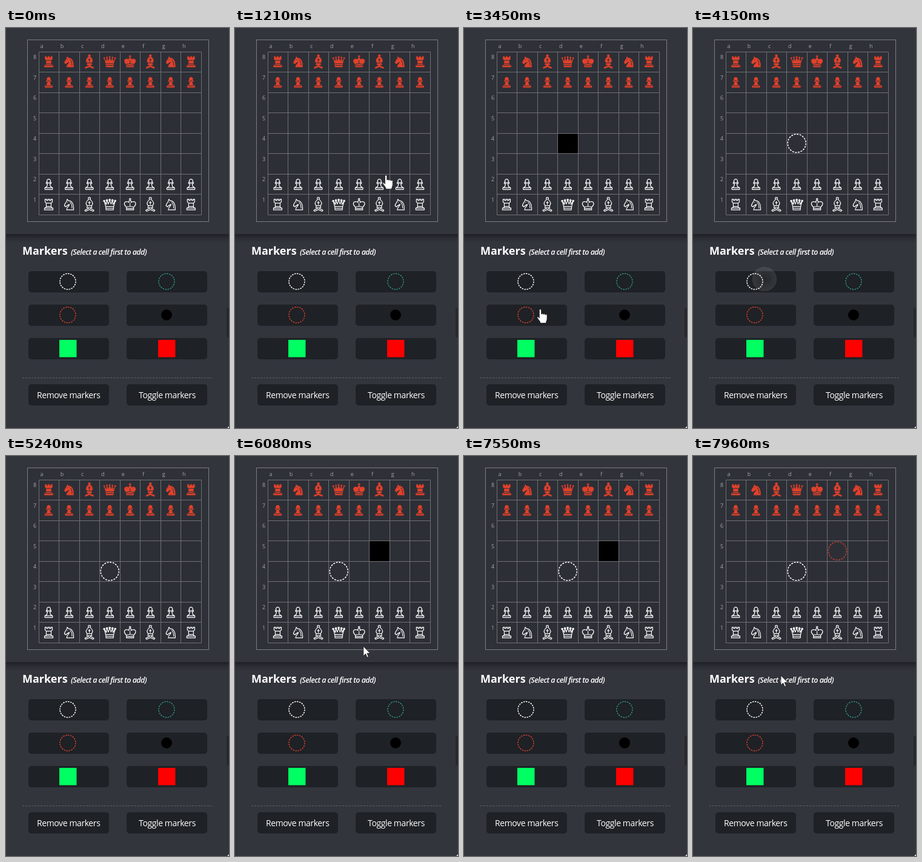
An HTML page that plays this animation: 368x658 px, repeating every 8000 ms.

```html
<!DOCTYPE html>
<html lang="en">
<head>
<meta charset="utf-8">
<title>Board markers</title>
<style>
  html, body { margin: 0; width: 100%; height: 100%; overflow: hidden; background: #33353d; }
  svg { display: block; width: 368px; height: 658px; font-family: "Open Sans", "Noto Sans", sans-serif; }
  .label { font-size: 9px; fill: #a3a5a9; text-anchor: middle; }
  .title { font-size: 18px; font-weight: 700; fill: #fff; }
  .hint { font-size: 12.5px; font-weight: 600; font-style: italic; letter-spacing: -.55px; fill: #fff; }
  .btn { font-size: 14px; letter-spacing: -.4px; fill: #fff; text-anchor: middle; }
  .red { fill: #e2412b; stroke: #e2412b; stroke-width: .4; }
  .red .detail { fill: none; stroke: #2d2f36; stroke-width: 1; }
  .white { fill: #2d2f36; stroke: #fff; stroke-width: 1.2; stroke-linejoin: round; }
  .white .detail { fill: none; stroke-width: 1.1; }
  .cursor { fill: #fff; stroke: #111; stroke-width: .8; stroke-linejoin: round; }
</style>
</head>
<body>
<svg id="stage" viewBox="0 0 368 658" xmlns="http://www.w3.org/2000/svg">
  <defs>
    <linearGradient id="shade" x2="0" y2="1">
      <stop offset="0" stop-color="#000" stop-opacity=".4"/>
      <stop offset=".5" stop-color="#000" stop-opacity=".13"/>
      <stop offset="1" stop-color="#000" stop-opacity="0"/>
    </linearGradient>
    <radialGradient id="glow">
      <stop offset="0" stop-color="#fff" stop-opacity=".04"/>
      <stop offset="1" stop-color="#fff" stop-opacity=".15"/>
    </radialGradient>
  </defs>
</svg>
<script>
const stage = document.getElementById('stage');
const LOOP = 8000, CELL = 33.55, LEFT = 54, TOP = 39;
const ROWS = [400, 455, 510, 586], COLS = [37, 199], BTN_W = 133, BTN_H = 35;

function add(tag, attrs, parent = stage) {
  const el = document.createElementNS('http://www.w3.org/2000/svg', tag);
  for (const k in attrs) {
    if (k === 'text') el.textContent = attrs[k];
    else el.setAttribute(k, attrs[k]);
  }
  parent.appendChild(el);
  return el;
}
const rect = (x, y, width, height, fill, rx = 0) => add('rect', { x, y, width, height, fill, rx });
const text = (x, y, str, cls) => add('text', { x, y, text: str, class: cls });
const ring = (cx, cy, r, stroke) => add('circle', {
  cx, cy, r, stroke, fill: 'none', 'stroke-width': 1.5, pathLength: 100, 'stroke-dasharray': '3.1 1.9'
});
const show = (el, on) => el.setAttribute('visibility', on ? 'visible' : 'hidden');
const lineX = i => Math.floor(LEFT + i * CELL) + .5;
const lineY = i => Math.floor(TOP + i * CELL) + .5;
const ball = (x, y) => `M${x - 1.2} ${y}a1.2 1.2 0 1 0 2.4 0a1.2 1.2 0 1 0-2.4 0`;

// Each piece: silhouette, inner lines
const PIECES = {
  rook: ['M-7 8.5V5.5H-5.5L-4 3.5V-2.5L-6-4.5V-9H-3.5V-7H-1.3V-9H1.3V-7H3.5V-9H6V-4.5L4-2.5V3.5L5.5 5.5H7V8.5Z',
    'M-5.5 5.5H5.5M-4 3H4M-4-2.5H4'],
  knight: ['M-3-9L-1-6.5C4-7 8-2 7.5 8.5H-4C-4 4 0 3 .5-.5C-2 1-3.5 1-5 3.5L-7.5 2C-8-1-4.5-4-3.8-6Z',
    'M-3-3.5L-2-4M1.5-4C4-2 5 2 5 6'],
  bishop: ['M0-12A1.5 1.5 0 0 1 .8-9C6-5 6.5-1 3.5 1.5L4 5H.8C1.5 8 6 7 7.5 9.5L6 11C4 9 1 10 0 7.5C-1 10-4 9-6 11L-7.5 9.5C-6 7-1.5 8-.8 5H-4L-3.5 1.5C-6.5-1-6-5-.8-9A1.5 1.5 0 0 1 0-12Z',
    'M0-6V0M-2-3.5H2M-3.5 1.7H3.5'],
  queen: ['M-6 8.5L-6.5 3L-9-6L-5.4-.5L-4.7-7L-2.2-1L0-8L2.2-1L4.7-7L5.4-.5L9-6L6.5 3L6 8.5Z'
    + [-2, -1, 0, 1, 2].map(i => ball(i * 4.5, Math.abs(i) - 8.2)).join(''),
    'M-6.3 3H6.3M-5.8 5.8H5.8'],
  king: ['M-6 8.5V4C-11 0-10-5-5.5-5C-4-5-2.5-4.4-1.5-3.5C-2.5-5.5-1.5-7 0-7C1.5-7 2.5-5.5 1.5-3.5C2.5-4.4 4-5 5.5-5C10-5 11 0 6 4V8.5Z',
    'M-6 3.8Q0 2 6 3.8M-5.5 6.2H5.5M0-2.5V2.5'],
  pawn: ['M-6.3 8.5V5.8L-3 3.8L-1.8-1.2H-4V-3.2H-2A3 3 0 1 1 2-3.2H4V-1.2H1.8L3 3.8L6.3 5.8V8.5Z',
    'M-5 5.8H5M-2-2.2H2']
};
const RANK = ['rook', 'knight', 'bishop', 'queen', 'king', 'bishop', 'knight', 'rook'];

function piece(name, col, row, cls) {
  const x = LEFT + (col + .5) * CELL - .3, y = TOP + (row + .5) * CELL;
  const g = add('g', { class: cls, transform: `translate(${x} ${y})` });
  if (name === 'king') add('path', { d: 'M0-11V-7M-2-9.3H2', 'stroke-width': 1.3 }, g);
  const [body, lines] = PIECES[name];
  add('path', { d: body }, g);
  add('path', { d: lines, class: 'detail' }, g);
}

// Board
rect(0, 0, 368, 658, '#33353d');
add('rect', { x: 35.5, y: 19.5, width: 299, height: 299, fill: '#2f3138', stroke: '#7b7d81' });
rect(lineX(0), lineY(0), 268, 268, '#2d2f36');

// The two cells that get a marker, and their state changes
const PICK_DELAY = 235, MARK_DELAY = 100;
const CLICKS = [
  { at: 2380, back: 3070, x: 171.5, y: 188 },
  { at: 4040, back: 4300, x: 118, y: 413 },
  { at: 5240, back: 5475, x: 243.5, y: 160.5 },
  { at: 7550, back: 7800, x: 107, y: 472 }
];
const cells = [[3, 4, '#fff'], [5, 3, '#c23d30']].map(([col, row, color], i) => ({
  col, row, color,
  fill: rect(lineX(col), lineY(row), CELL, CELL, '#000'),
  pickAt: CLICKS[i * 2].at + PICK_DELAY,
  markAt: CLICKS[i * 2 + 1].at + MARK_DELAY
}));

let grid = '';
for (let i = 0; i < 9; i++) {
  grid += `M${lineX(i)} ${lineY(0)}V${lineY(8)}M${lineX(0)} ${lineY(i)}H${lineX(8)}`;
}
add('path', { d: grid, stroke: '#6e7075', fill: 'none' });

for (let i = 0; i < 8; i++) {
  text(59 + i * CELL, 33, 'abcdefgh'[i], 'label');
  text(47.5, 51 + i * CELL, 8 - i, 'label');
  piece(RANK[i], i, 0, 'red');
  piece('pawn', i, 1, 'red');
  piece('pawn', i, 6, 'white');
  piece(RANK[i], i, 7, 'white');
}
for (const c of cells) {
  c.mark = ring(LEFT + (c.col + .5) * CELL - .2, TOP + (c.row + .5) * CELL - .3, 15, c.color);
}

// Marker panel
rect(0, 339, 368, 15, 'url(#shade)');
text(27, 373, 'Markers', 'title');
text(107, 373, '(Select a cell first to add)', 'hint');
for (const y of ROWS) {
  for (const x of COLS) rect(x, y, BTN_W, BTN_H, '#1e2125', 5);
}
ring(102, 417, 13, '#fff');
ring(265, 417, 13, '#2f8f86');
ring(102, 472, 13, '#d2402f');
add('circle', { cx: 265, cy: 472, r: 9, fill: '#000' });
rect(88, 513, 28.5, 28.5, '#00ff62');
rect(251, 513, 28.5, 28.5, '#f00');
add('path', { d: 'M27 575.5H342', stroke: '#5f6167', 'stroke-dasharray': '3 2' });
text(103.2, 609, 'Remove markers', 'btn');
text(266, 609, 'Toggle markers', 'btn');
rect(364, 460, 4, 49, '#26282d', 1);
add('path', { d: 'M368 655V658H365Z', fill: '#ddd' });

// Pointer
const ripple = add('circle', { fill: 'url(#glow)' });
const arrow = add('path', { class: 'cursor', d: 'M0 0V16L3.7 12.4L6.2 18.3L8.6 17.3L6.1 11.6H11.3Z' });
const hand = add('path', {
  class: 'cursor',
  d: 'M-1.7 15V2A1.7 1.7 0 0 1 1.7 2V8.5A1.6 1.6 0 0 1 4.8 9A1.6 1.6 0 0 1 8 9.8A1.6 1.6 0 0 1 11.2 11V16C11.2 19 9.5 20 9.5 23.3H0C0 20-3 18-5 14.5C-5.5 12-3 12-1.7 15Z'
});

const ENTER = { at: 840, x: 315, y: 634 };
// start, end, destination
const MOVES = [
  [840, 1600, 180, 203],
  [1670, 1830, 172, 190],
  [3000, 3300, 126, 464],
  [3450, 3530, 121, 424],
  [3680, 3780, 119, 416],
  [4250, 4550, 274, 177],
  [4700, 5020, 244, 162],
  [5930, 6470, 129, 380],
  [6620, 6850, 111, 417],
  [7010, 7330, 108, 473],
  [7750, 7950, 145, 361]
];

// Sideways at a steady pace, vertically slowing down
function pointerAt(t) {
  let { x, y } = ENTER;
  for (const [start, end, toX, toY] of MOVES) {
    const p = Math.min(Math.max((t - start) / (end - start), 0), 1);
    x += (toX - x) * p;
    y += (toY - y) * (1 - (1 - p) ** 3.6);
  }
  return { x, y };
}

function clickable({ x, y }) {
  const inside = (left, top, w, h) => x >= left && x <= left + w && y >= top && y <= top + h;
  return inside(LEFT, TOP, 268, 268) ||
    ROWS.some(top => COLS.some(left => inside(left, top, BTN_W, BTN_H)));
}

function draw(t) {
  for (const c of cells) {
    show(c.fill, t >= c.pickAt && t < c.markAt);
    show(c.mark, t >= c.markAt);
  }

  const click = CLICKS.find(c => t >= c.at && t < c.back);
  const age = click ? t - click.at : 0;
  const grow = age < PICK_DELAY ? Math.min(age / 160, 1) : 0;
  ripple.setAttribute('r', 29 * grow);
  ripple.setAttribute('opacity', grow);
  if (click) {
    ripple.setAttribute('cx', click.x);
    ripple.setAttribute('cy', click.y);
  }

  const pos = pointerAt(t);
  const visible = t >= ENTER.at && !click;
  const over = clickable(pos);
  show(hand, visible && over);
  show(arrow, visible && !over);
  (over ? hand : arrow).setAttribute('transform', `translate(${pos.x} ${pos.y})`);
}

const begin = performance.now();
function tick() {
  draw((performance.now() - begin) % LOOP);
  requestAnimationFrame(tick);
}
tick();
</script>
</body>
</html>
```
